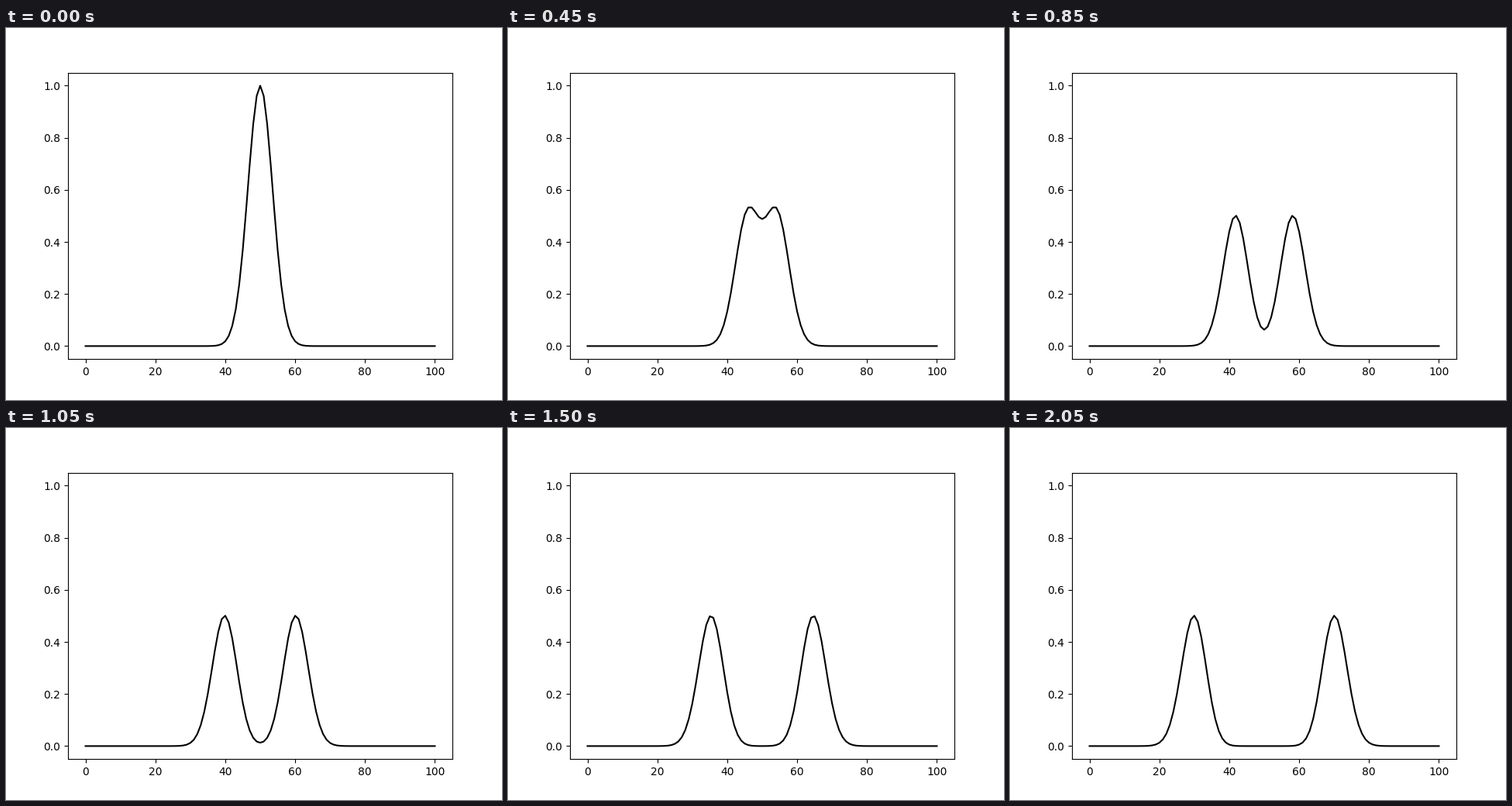
Animation of 640 by 480 pixels, one loop 2.1 s. Source, as a matplotlib script:

```python
import numpy as np
import matplotlib.pyplot as plt
from matplotlib.animation import FuncAnimation

FRAMES = 42
INTERVAL = 50   # ms
COURANT = 0.5   # c * dt / dx


def solve_wave(u0, steps, courant):
    """Leapfrog solution of the 1D wave equation with fixed ends."""
    u = np.zeros((steps, u0.size))
    u[0] = u[1] = u0
    for n in range(1, steps - 1):
        curvature = u[n, 2:] - 2 * u[n, 1:-1] + u[n, :-2]
        u[n + 1, 1:-1] = 2 * u[n, 1:-1] - u[n - 1, 1:-1] + courant**2 * curvature
    return u


x = np.arange(101)
wave = solve_wave(np.exp(-((x - 50) / 5) ** 2), FRAMES, COURANT)

fig, ax = plt.subplots(figsize=(6.4, 4.8), dpi=100)
line, = ax.plot(x, wave[0], color="black", lw=1.5)


def update(n):
    line.set_ydata(wave[n])
    return line,


anim = FuncAnimation(fig, update, frames=FRAMES, interval=INTERVAL,
                     repeat=True, repeat_delay=0)
plt.show()
```
